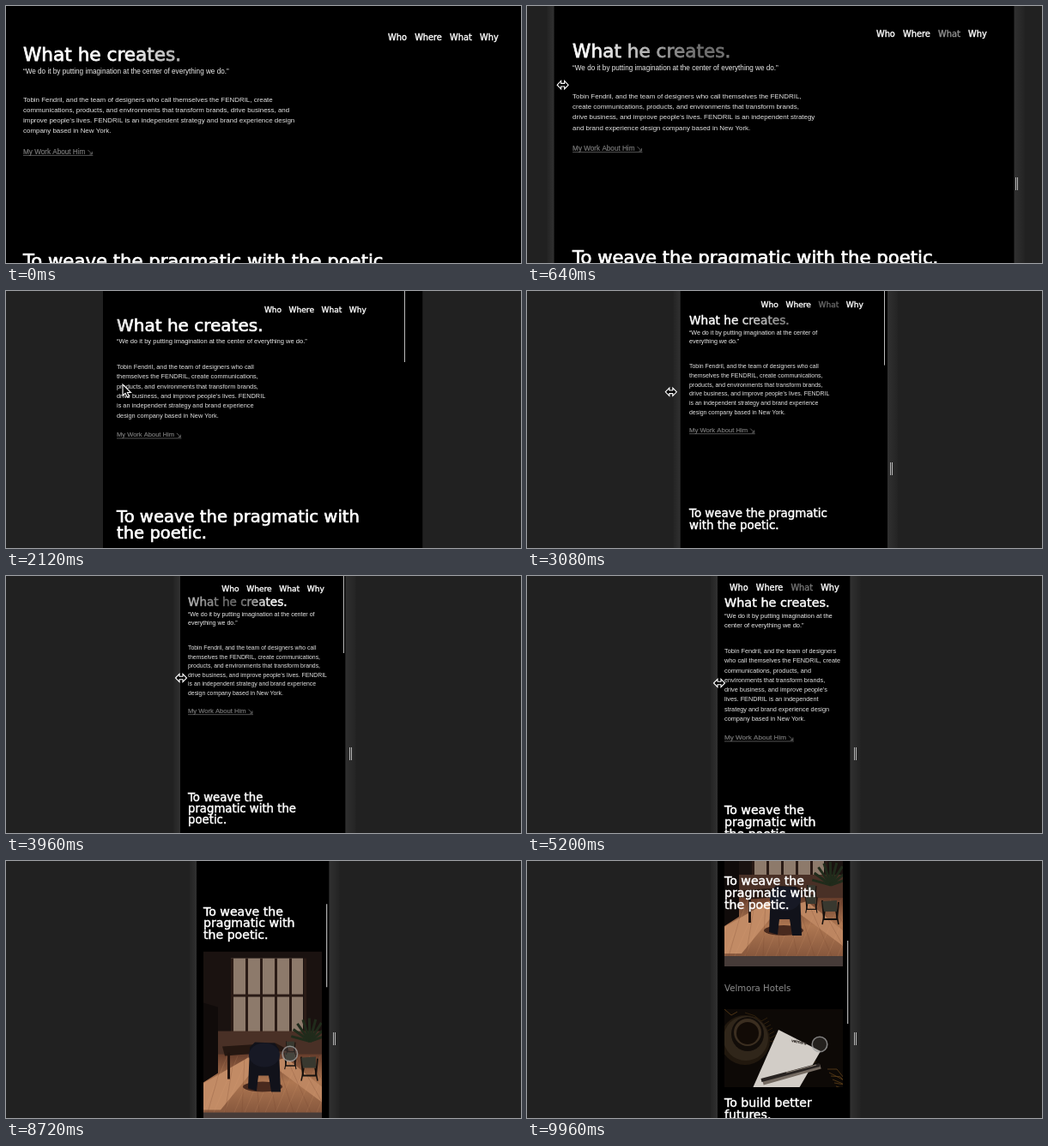
Write an HTML page with a canvas that moves like this. It is 600 px wide and 300 px high and loops after 10 s.

```html
<!DOCTYPE html>
<html lang="en">
<head>
<meta charset="utf-8">
<title>Responsive page</title>
<style>
html, body { margin: 0; width: 100%; height: 100%; overflow: hidden; background: #212121; }
canvas { display: block; width: 600px; height: 300px; }
</style>
</head>
<body>
<canvas id="stage" width="600" height="300"></canvas>
<script>
const ctx = document.getElementById('stage').getContext('2d');
const LOOP = 10000;
const WIDE = '"DejaVu Sans", sans-serif';
const BODY = '"Liberation Sans", Arial, sans-serif';
const QUOTE = '“We do it by putting imagination at the center of everything we do.”';
const ABOUT = 'Tobin Fendril, and the team of designers who call themselves the FENDRIL, ' +
  'create communications, products, and environments that transform brands, ' +
  'drive\u00a0business, and improve people’s lives. FENDRIL is an independent strategy ' +
  'and brand experience design company based in New\u00a0York.';

// time, edge, left, em, headY, nextY, navRight, navY, navSize, column (em), heading column (em)
const LAYOUT = [
  [0, 0, 20, 8.16, 64, 305, 574, 39.5, 9.8, 41, 25],
  [1160, 57, 80, 8.16, 57, 297, 505, 32.5, 9.8, 31.95, 18],
  [2120, 113, 129, 7.55, 47, 269.5, 420, 24.5, 9.05, 24, 15.5],
  [3160, 184, 194, 7.1, 38, 264, 390, 18.5, 9.1, 24, 12],
  [3960, 203, 212, 7.06, 35, 263, 371, 17.5, 9.1, 24, 11],
  [5200, 222, 230, 7.5, 36, 278, 364, 16.5, 9.73, 18.65, 9]
];
const POINTER = [
  [0, 8, 85], [1160, 69, 98], [2120, 136, 109], [2500, 144, 117], [3960, 204, 119],
  [5200, 224, 125], [5600, 224, 125], [6280, 224, 207], [6700, 222, 218],
  [7150, 328, 228], [8400, 328, 228], [9900, 341, 214]
];

const clamp = u => Math.max(0, Math.min(1, u));
const mix = (a, b, u) => a + (b - a) * u;
const smooth = u => (1 - Math.cos(Math.PI * clamp(u))) / 2;
const grey = v => `rgb(${v},${v},${v})`;

function sample(keys, t) {
  const next = keys.findIndex(k => k[0] > t);
  if (next < 0) return keys[keys.length - 1].slice(1);
  const a = keys[next - 1], b = keys[next], u = (t - a[0]) / (b[0] - a[0]);
  return a.slice(1).map((v, i) => mix(v, b[i + 1], u));
}

function rect(x, y, w, h, color) {
  ctx.fillStyle = color;
  ctx.fillRect(x, y, w, h);
}

function poly(points, color) {
  ctx.beginPath();
  points.forEach(([x, y]) => ctx.lineTo(x, y));
  ctx.closePath();
  ctx.fillStyle = color;
  ctx.fill();
}

function line(points, color, width = 1) {
  ctx.beginPath();
  points.forEach(([x, y], i) => i ? ctx.lineTo(x, y) : ctx.moveTo(x, y));
  ctx.strokeStyle = color;
  ctx.lineWidth = width;
  ctx.stroke();
}

function oval(x, y, rx, ry, color) {
  ctx.beginPath();
  ctx.ellipse(x, y, rx, ry, 0, 0, 7);
  ctx.fillStyle = color;
  ctx.fill();
}

function text(str, x, y, size, color, family = BODY, weight = 0) {
  ctx.font = `${size}px ${family}`;
  ctx.fillStyle = ctx.strokeStyle = color;
  ctx.fillText(str, x, y);
  if (weight) {
    ctx.lineWidth = size * weight;
    ctx.strokeText(str, x, y);
  }
  return ctx.measureText(str).width;
}

function wrap(str, size, family, width) {
  ctx.font = `${size}px ${family}`;
  const lines = [''];
  for (const word of str.split(' ')) {
    const last = lines[lines.length - 1];
    const joined = last ? last + ' ' + word : word;
    if (!last || ctx.measureText(joined).width <= width) lines[lines.length - 1] = joined;
    else lines.push(word);
  }
  return lines;
}

function title(lines, x, y, size) {
  lines.forEach((str, i) => text(str, x, y + i * size * 0.96, size * 0.98, '#fff', WIDE, 0.035));
}

// Amount of grey at position u (0..1) of the shimmering heading
function shade(u, t) {
  const phase = (t + 1640) % 2800;
  const band = x => Math.min(clamp((x + 0.33) / 0.7), clamp((0.85 - x) / 0.3));
  return Math.max(band(u + phase * 0.0008), band(u + (phase - 2800) * 0.0008));
}

function shimmer(str, x, y, size, t) {
  ctx.font = `${size}px ${WIDE}`;
  const fill = ctx.createLinearGradient(x, 0, x + ctx.measureText(str).width, 0);
  for (let u = 0; u <= 1; u += 0.0625) fill.addColorStop(u, grey(Math.round(255 - 145 * shade(u, t))));
  text(str, x, y, size, fill, WIDE, 0.035);
}

function nav(right, y, size, t) {
  const words = ['Who', 'Where', 'What', 'Why'];
  const blink = Math.round(255 - 155 * (1 - Math.cos(t * Math.PI / 1000)) / 2);
  let x = right - size * 13.16;
  for (const word of words) {
    x += text(word, x, y, size, word === 'What' ? grey(blink) : '#fff', WIDE, 0.04) + size * 0.94;
  }
}

function link(x, y, size) {
  const color = '#777';
  const w = text('My Work About Him ', x, y, size, color, BODY, 0.025);
  const ax = x + w + size * 0.1, d = size * 0.6;
  line([[ax, y - d], [ax + d, y]], color, 0.8);
  line([[ax + d, y - d * 0.6], [ax + d, y], [ax + d * 0.4, y]], color, 0.8);
  line([[x, y + 1.5], [ax + d + 1, y + 1.5]], color, 0.7);
}

function framed(x, y, w, h, paint) {
  ctx.save();
  ctx.translate(x, y);
  ctx.beginPath();
  ctx.rect(0, 0, w, h);
  ctx.clip();
  paint(w, h);
  ctx.restore();
}

function chair(x, y, s) {
  ctx.save();
  ctx.translate(x, y);
  ctx.scale(s, s);
  line([[1, 0], [3, 22], [18, 22], [20, 2]], '#17120f', 2);
  poly([[1, 1], [18, 0], [18, 13], [3, 13]], '#38382f');
  line([[4, 13], [1, 28]], '#120d0b', 1.5);
  line([[17, 13], [20, 28]], '#120d0b', 1.5);
  ctx.restore();
}

function lounge(w, h) {
  rect(0, 0, w, h, '#1a1210');
  rect(32, 8, 84, 88, '#8d7a6b');
  for (let x = 32; x < 120; x += 17) rect(x, 8, 3, 90, '#2a1b16');
  rect(32, 50, 84, 3, '#2a1b16');
  rect(0, 93, w, 32, '#493026');
  const floor = ctx.createLinearGradient(0, 115, 0, 190);
  floor.addColorStop(0, '#5b3425');
  floor.addColorStop(0.5, '#ae7752');
  floor.addColorStop(1, '#85563c');
  rect(0, 120, w, 70, floor);
  poly([[0, 154], [52, 124], [70, 124], [20, 185], [0, 185]], '#c28b65');
  poly([[76, 130], [96, 124], [138, 158], [138, 176]], '#bd8661');
  for (let i = -4; i < 15; i++) {
    line([[i * 12, 122], [i * 20 - 35, 188]], '#70422b55', 0.7);
    line([[i * 12, 188], [i * 12 + 28, 122]], '#e4ad7f30', 0.7);
  }
  rect(0, 188, w, 12, '#463b38');
  poly([[0, 60], [17, 65], [17, 142], [0, 153]], '#100b0a');
  poly([[22, 111], [84, 107], [101, 116], [25, 122]], '#251711');
  rect(28, 118, 3, 31, '#21130e');
  oval(69, 158, 23, 6, '#492a1e');
  poly([[54, 112], [60, 106], [83, 107], [88, 114], [90, 164], [79, 164], [76, 145], [64, 145], [62, 163], [52, 160]], '#11121a');
  oval(71, 121, 18, 14, '#171925');
  for (let i = 0; i < 9; i++) {
    const a = Math.PI * (1.05 + i * 0.11);
    line([[124, 105], [124 + 22 * Math.cos(a), 103 + 25 * Math.sin(a)]], '#202b1b', 3);
  }
  chair(94, 118, 0.7);
  chair(113, 123, 1);
  chair(96, 105, 0.55);
}

function desk(w, h) {
  rect(0, 0, w, h, '#0d0906');
  for (let i = 0; i < 20; i++) {
    const x = (i * 47) % 143, y = (i * 31) % 97;
    line([[x - 11, y - 3], [x, y + 4 * Math.sin(i)], [x + 8, y + 7], [x + 15, y + 3]], i % 3 ? '#38260f' : '#604018', 0.8);
  }
  oval(24, 36, 29, 29, '#21180e');
  oval(25, 34, 26, 26, '#30261a');
  oval(27, 29, 19, 20, '#120d09');
  oval(27, 27, 16, 16, '#3b2e20');
  oval(27, 28, 13, 13, '#120b06');
  poly([[63, 24], [112, 49], [87, 92], [33, 92]], '#d2cdc7');
  ctx.save();
  ctx.translate(78, 38);
  ctx.rotate(0.2);
  text('velmora', 0, 0, 4.3, '#302a26', WIDE, 0.06);
  ctx.restore();
  line([[45, 86], [112, 67]], '#756b62', 5);
  line([[43, 83], [111, 65]], '#282321', 4);
  line([[72, 74], [107, 65]], '#a59a8d', 0.8);
}

function page(k, t, scroll) {
  const [edge, x, em, headY, nextY, navRight, navY, navSize, col, headCol] = k;
  const wide = (600 - 2 * edge) / em > 37.5;
  const headSize = em * (wide ? 2.65 : 1.92), small = em * 0.975;
  let y = headY - scroll;
  nav(navRight, navY - scroll, navSize, t);
  shimmer('What he creates.', x, y, headSize, t);

  y += em * (wide ? 1.8 : 1.68);
  const quote = wide ? [QUOTE] : wrap(QUOTE, em, BODY, col * small);
  quote.forEach((str, i) => text(str, x, y + i * em * 1.5, em, '#eee'));
  y += (quote.length - 1) * em * 1.5 + em * 4.05;
  const about = wrap(ABOUT, small, BODY, col * small);
  about.forEach((str, i) => text(str, x, y + i * em * 1.5, small, '#e4e4e4'));
  y += (about.length - 1) * em * 1.5 + em * 3;
  link(x, y, em * (wide ? 1 : 1.08));

  if (t > 7000) {
    framed(x, 320 - scroll, 138, 200, lounge);
    text('Velmora Hotels', x, 549 - scroll, 10.2, '#8c8c8c', WIDE);
    framed(x, 570 - scroll, 138, 91, desk);
    title(['To build better', 'futures.'], x, 684 - scroll, headSize);
  }
  const lines = wrap('To weave the pragmatic with the poetic.', headSize, WIDE, headCol * headSize);
  title(lines, x, Math.max(nextY - scroll, 28), headSize);
}

function resizers(left, right, t) {
  if (t < 300 || (t > 1900 && t < 2350)) return;
  const bar = (from, to) => {
    const fill = ctx.createLinearGradient(from, 0, to, 0);
    fill.addColorStop(0, '#303030');
    fill.addColorStop(1, '#242424');
    rect(Math.min(from, to), 0, Math.abs(to - from), 300, fill);
  };
  bar(left, left - 8);
  bar(right, right + 12);
}

function handle(right, t) {
  if (t < 300 || (t > 1900 && t < 2350)) return;
  const x = Math.round(right + mix(1, 4.5, clamp((t - 1160) / 2800)));
  rect(x, 200, 1, 15, '#b5b5b5');
  rect(x + 2, 200, 1, 15, '#b5b5b5');
}

function outlined(points) {
  poly(points, '#000');
  line([...points, points[0], points[1]], '#fff', 1.1);
}

function pointer(t) {
  if (t < 200) return;
  const [x, y] = sample(POINTER, t);
  if (t > 6700 && x > 230) {
    ctx.beginPath();
    ctx.arc(x, y, 8.8, 0, 7);
    ctx.fillStyle = 'rgba(120,120,120,.22)';
    ctx.fill();
    ctx.strokeStyle = 'rgba(165,165,165,.75)';
    ctx.lineWidth = 1.6;
    ctx.stroke();
    return;
  }
  ctx.save();
  ctx.translate(x, y);
  if (t > 1800 && t < 2500) {
    outlined([[0, 0], [0, 13], [3, 10.3], [5.3, 15], [7.5, 14], [5.4, 9.5], [9.5, 9.5]]);
  } else {
    outlined([[-6.5, 0], [-2, -4.7], [-2, -1.8], [2, -1.8], [2, -4.7],
      [6.5, 0], [2, 4.7], [2, 1.8], [-2, 1.8], [-2, 4.7]]);
  }
  ctx.restore();
}

function scrollbar(right, t, scroll) {
  if (t > 1900 && t < 4700) {
    const x = right - mix(22, 3, clamp((t - 2120) / 1000));
    rect(Math.round(x), 0, 1, mix(83, 90, clamp((t - 2120) / 1840)), '#bbb');
  } else if (t > 7290) {
    rect(373, scroll * 93 / 397, 1.3, 97, '#aaa');
  }
}

function draw(t) {
  const k = sample(LAYOUT, t);
  const left = k[0], right = 600 - left - 1.5 * clamp(left / 50);
  const scroll = 200 * smooth((t - 7290) / 1050) + 197 * smooth((t - 8460) / 1490);
  rect(0, 0, 600, 300, '#212121');
  resizers(left, right, t);
  ctx.save();
  ctx.beginPath();
  ctx.rect(left, 0, right - left, 300);
  ctx.clip();
  rect(left, 0, right - left, 300, '#000');
  page(k, t, scroll);
  ctx.restore();
  scrollbar(right, t, scroll);
  handle(right, t);
  pointer(t);
}

let start;
function tick(now) {
  start ??= now;
  draw((now - start) % LOOP);
  requestAnimationFrame(tick);
}
draw(0);
requestAnimationFrame(tick);
</script>
</body>
</html>
```
